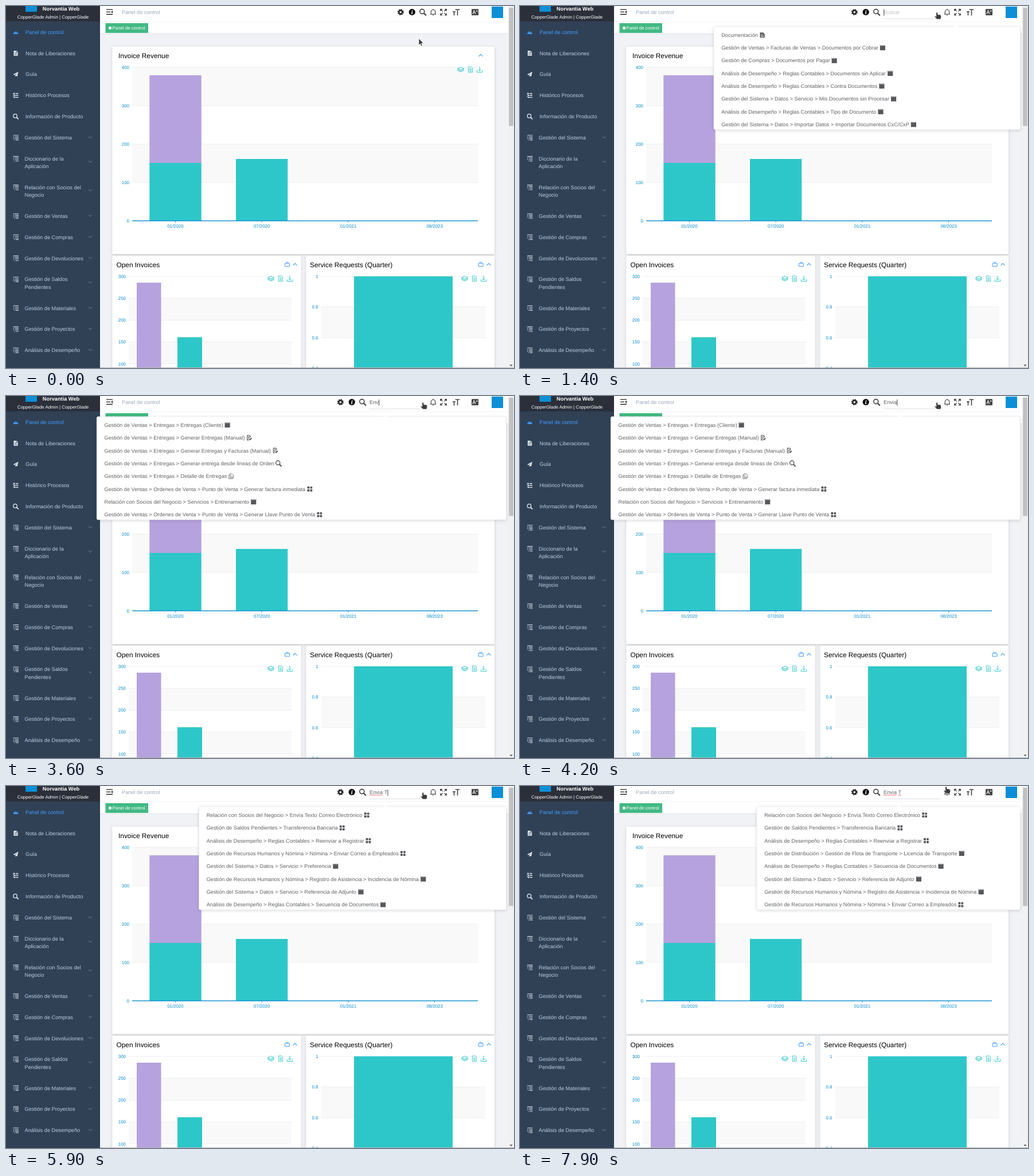
An HTML page for the animation above (8 s loop, 886x632 px).

```html
<!DOCTYPE html>
<html lang="es">
<head>
<meta charset="utf-8">
<title>Panel de control</title>
<style>
html, body { margin: 0; width: 100%; height: 100%; overflow: hidden; background: #fff; }
svg { display: block; }
text { font-family: "Liberation Sans", Arial, sans-serif; text-rendering: geometricPrecision; white-space: pre; }
.line { fill: none; stroke: currentColor; stroke-width: 1; }
</style>
</head>
<body>
<svg id="stage" width="886" height="632" viewBox="0 0 886 632">
  <defs>
    <filter id="shadow" x="-10%" y="-10%" width="120%" height="120%">
      <feDropShadow dx="0" dy="1.3" stdDeviation="2.6" flood-opacity=".16"/>
    </filter>
  </defs>
  <g id="page"></g>
  <g id="live"></g>
</svg>
<script>
const BODY = 9.215, SMALL = 7.9, TITLE = 11.85;
const TEAL = '#2ec7c9', PURPLE = '#b6a2de', AXIS = '#008acd', BLUE = '#409eff';
const $ = id => document.getElementById(id);

const rect = (x, y, w, h, fill, more = '') =>
  `<rect x="${x}" y="${y}" width="${w}" height="${h}" fill="${fill}" ${more}/>`;
const text = (x, y, str, size, fill, more = '') =>
  `<text x="${x}" y="${y}" font-size="${size}" fill="${fill}" ${more}>${str.replace(/>/g, '&gt;')}</text>`;
const line = (d, w = 1) => `<path class="line" style="stroke-width:${w}" d="${d}"/>`;
const solid = d => `<path fill="currentColor" d="${d}"/>`;
const pen = document.createElement('canvas').getContext('2d');
pen.font = '100px "Liberation Sans", Arial, sans-serif';
const widthOf = str => pen.measureText(str).width * BODY / 100;

// Every icon is drawn around its own centre
const icons = {
  gear: `<circle class="line" r="3" style="stroke-width:2.4"/>
    <circle class="line" r="4.7" style="stroke-width:1.7" stroke-dasharray="2 1.69"/>`,
  info: '<circle r="5.6" fill="currentColor"/><path d="M.5-3.6V-2.2M-.9-.7H.3L-.4 3H.9" fill="none" stroke="#fff" stroke-width="1.4"/>',
  search: '<circle class="line" cx="-1.1" cy="-1.1" r="3.7" style="stroke-width:1.5"/>' + line('M1.6 1.6L5.4 5.4', 2),
  bell: line('M-5 3.4H5M-3.7 3.4V-.6A3.7 3.7 0 0 1 3.7-.6V3.4M0-4.3V-5.6M-1.2 5.2H1.2', 1.1),
  full: line('M-1.4-1.4L-5-5M1.4-1.4L5-5M-1.4 1.4L-5 5M1.4 1.4L5 5M-5.2-2V-5.2H-2M2-5.2H5.2V-2M5.2 2V5.2H2M-2 5.2H-5.2V2', 1.2),
  size: line('M-1.4-4.6H6.2M2.5-4.6V5.8M-6-.8H-1M-3.5-.8V5.8', 1.6),
  lang: rect(-6, -5.5, 12, 11, 'currentColor', 'rx="1"') +
    '<path d="M-4.2 3.2L-1.6-3.4L1 3.2M-3.2 1H0M2.2-3.2L4.6-.8M4.6-3.2L2.2-.8" fill="none" stroke="#fff" stroke-width="1"/>',
  menu: line('M-5.5-4.2H5.5M-5.5 0H1.5M-5.5 4.2H5.5', 1.3) + solid('M5.6-2.4V2.4L2.6 0Z'),
  up: line('M-3.5 1.8L0-1.7L3.5 1.8', 1.1),
  down: line('M-2.8-1.3L0 1.4L2.8-1.3', 1),
  dash: solid('M-5 4A5 5 0 1 1 5 4Z') + '<path d="M0 2L1.6-2.4M-3.4 1H-2.4M2.6 1H3.6M-2-2L-1.3-1.3" stroke="#304156" stroke-width="1"/>',
  doc: solid('M-4-5H1.6L4.2-2.4V5H-4Z') + '<path d="M-2.4-.4H2.6M-2.4 2.2H2.6M1-4.6V-2H3.8" fill="none" stroke="#304156" stroke-width=".9"/>',
  plane: solid('M5-5L-5 .4L-2.2 1.8L3-2.6L-1 2.3V5L.8 3.1L3 4.2Z'),
  tree: solid('M-5-5H-1.6V-2.6H-5ZM-3.4-1.2H-.6V1.2H-3.4ZM-3.4 2.6H-.6V5H-3.4Z') +
    line('M0-3.8H5M.4 0H5M.4 3.8H5', 1.7) + line('M-4.5-3V3.8H-3', .8),
  list: line('M-4.7-4H4.7M-1.6-1.3H4.7M-1.6 1.4H4.7M-.4 4.1H4.7', 1.1) + line('M-4.7-1.3H-3M-4.7 1.4H-3M-3 4.1H-1.8', 1.1),
  layers: line('M0-4.4L5-2L0 .4L-5-2ZM-5-2V1.6L0 4.2L5 1.6V-2M-5 0L0 2.4L5 0', .9),
  sheet: line('M-3.6-4.8H1.6L3.6-2.8V4.8H-3.6ZM-2-1.4H2M-2 .6H2M-2 2.6H2', .9),
  save: line('M0-5V2.2M-2.8-.4L0 2.4L2.8-.4M-4.8 1.4V4.6H4.8V1.4', 1),
  box: line('M-4-1.6H4V3.4H-4ZM-2.6-3.4H2.6', 1),
  win: solid('M-4.7-4.6H-3.4L-2.6-3H-1.6L-2.2-4.6H-.4L.4-3H1.4L.8-4.6H2.2L3-3H3.6L3.2-4.6H4.7V4.5H-4.7Z'),
  note: solid('M-4-4.6H1.4L4.4-1.6V4.6H-4Z') + '<path d="M-2.4-1H1M-2.4 1.2H2.8M-2.4 3H2.8" stroke="#fff" stroke-width=".8"/>',
  edit: line('M2.4-1V-3L1-4.4H-3.4V4H-.6M-1.8-2H1M-1.8 0H1M-1.8 2H0', 1.2) + solid('M.2 4.4L.6 2.4L3.4-.4L5 1.2L2.2 4Z'),
  files: line('M-2-4.4H1.6L4.2-1.8V2.6H-2ZM-2-2.4H-4.2V4.4H2.4V2.6M-.6 0H2.6', .8),
  grid: solid('M-4.5-4.5H-.6V-.6H-4.5ZM-4.5 .6H-.6V4.5H-4.5ZM.6 .6H4.5V4.5H.6Z') + '<circle cx="2.6" cy="-2.5" r="2.1" fill="currentColor"/>'
};
const icon = (name, x, y, color, scale = 1) =>
  `<g transform="translate(${x} ${y}) scale(${scale})" color="${color}">${icons[name]}</g>`;

function sidebar() {
  const links = [['dash', 'Panel de control'], ['doc', 'Nota de Liberaciones'], ['plane', 'Guía'],
    ['tree', 'Histórico Procesos'], ['search', 'Información de Producto']];
  const groups = ['Gestión del Sistema', 'Diccionario de la|Aplicación', 'Relación con Socios del|Negocio',
    'Gestión de Ventas', 'Gestión de Compras', 'Gestión de Devoluciones', 'Gestión de Saldos|Pendientes',
    'Gestión de Materiales', 'Gestión de Proyectos', 'Análisis de Desempeño'];
  let out = rect(0, 0, 164, 632, '#304156') + rect(0, 0, 164, 27, '#2b2f3a') +
    rect(34, -10, 20, 20, '#0b8fd6') +
    text(96, 8, 'Norvantia Web', BODY, '#fff', 'text-anchor="middle" font-weight="bold"') +
    text(82, 21.8, 'CopperGlade Admin | CopperGlade', SMALL, '#fff', 'text-anchor="middle"');
  let y = 45.5;
  links.forEach(([name, label], i) => {
    out += icon(name, 17, y, i ? '#e3e9f0' : BLUE, .88) + text(34, y + 3.2, label, BODY, i ? '#bfcbd9' : BLUE);
    y += 36.85;
  });
  for (const label of groups) {
    const rows = label.split('|'), extra = (rows.length - 1) * 13.2;
    out += icon('list', 17.3, y, '#d5dde6') + icon('down', 147, y - .6 + extra * .42, '#78879a');
    rows.forEach((row, i) => out += text(32.5, y + 3.2 + i * 13.2, row, BODY, '#bfcbd9'));
    y += 36.85 + extra;
  }
  return out;
}

// Value axis with bands; rows run from the top tick downwards
function chart(x, right, top, step, labels, grayFirst, bars) {
  let out = '';
  labels.forEach((label, i) => {
    const y = top + i * step;
    if ((i % 2 === 0) === grayFirst && label !== '0') out += rect(x, y, right - x, step, '#f9f9f9');
  });
  labels.forEach((label, i) => {
    const y = top + i * step;
    out += rect(x, y - .35, right - x, .7, '#e9e9e9') +
      text(x - 5, y + 2.7, label, SMALL, AXIS, 'text-anchor="end"');
  });
  for (const [bx, by, w, h, fill] of bars) out += rect(bx, by, w, h, fill);
  return out;
}
const tools = (x, y) => icon('layers', x, y, TEAL) + icon('sheet', x + 17, y, TEAL) + icon('save', x + 33, y, TEAL);
const card = (x, y, w, h) => rect(x, y, w, h, '#fff', 'rx="1.5" filter="url(#shadow)"');

function dashboard() {
  let out = rect(164, 0, 722, 632, '#f0f2f5') +
    card(185.5, 71, 666.5, 362) + card(185.5, 436, 329, 230) + card(523.5, 436, 328.5, 230) +
    text(196, 91.3, 'Invoice Revenue', TITLE, '#000') + icon('up', 828, 86.3, BLUE) +
    chart(220, 823, 107, 67, ['400', '300', '200', '100', '0'], true,
      [[250.3, 121, 90.4, 153, PURPLE], [250.3, 274, 90.4, 101, TEAL], [401, 267, 90.3, 108, TEAL]]) +
    rect(220, 374.4, 603, 1.3, AXIS) + tools(793, 111);
  ['01/2020', '07/2020', '01/2021', '08/2023'].forEach((label, i) => {
    const x = 295.4 + i * 150.75;
    out += rect(x - .4, 375, .8, 3.3, AXIS) + text(x, 386.6, label, SMALL, AXIS, 'text-anchor="middle"');
  });
  return out +
    text(192.5, 456.3, 'Open Invoices', TITLE, '#000') + icon('box', 490.5, 451, BLUE) + icon('up', 504, 451, BLUE) +
    chart(214, 498, 472, 38.2, ['300', '250', '200', '150', '100'], false,
      [[228, 483, 42.5, 149, PURPLE], [299, 578.3, 43, 54, TEAL]]) + tools(462, 476) +
    text(530, 456.3, 'Service Requests (Quarter)', TITLE, '#000') + icon('box', 828, 451, BLUE) + icon('up', 842, 451, BLUE) +
    chart(549.5, 836, 472, 53.5, ['1', '0.8', '0.6', '0.4'], false, [[607, 472, 172, 160, TEAL]]) + tools(800, 476);
}

function topbar() {
  return rect(164, 0, 712, 48.5, '#fff') + rect(164, 27.3, 712, .7, '#eceef0') + rect(164, 48.2, 712, .8, '#d8dce5') +
    icon('menu', 180.5, 10.3, '#222') + text(202, 13.8, 'Panel de control', BODY, '#97a8be') +
    rect(173.5, 30, 74.5, 17, '#42b983') + '<circle cx="181.5" cy="38.4" r="2.6" fill="#fff"/>' +
    text(185.5, 41.4, 'Panel de control', SMALL, '#fff') +
    icon('bell', 745, 10.8, '#333') + icon('full', 763, 10.8, '#333') + icon('size', 785, 10.8, '#444') +
    icon('lang', 818, 10.8, '#444') + rect(847, 1, 20, 20, '#0b8fd6');
}

const scrollbar = () => rect(876, 0, 10, 632, '#f1f1f1') + rect(877.2, 3, 7.6, 206.5, '#c1c1c1') +
  solid('M878.4 626.3H883.6L881 629Z') + rect(164, 631, 722, 1, '#b5b5b5');

const SALES = 'Gestión de Ventas > ', BUYS = 'Gestión de Compras > ', SHIP = SALES + 'Entregas > ',
  POS = SALES + 'Ordenes de Venta > Punto de Venta > ', RULES = 'Análisis de Desempeño > Reglas Contables > ',
  SYSTEM = 'Gestión del Sistema > Datos > ', STAFF = 'Gestión de Recursos Humanos y Nómina > ',
  ATTEND = STAFF + 'Registro de Asistencia > ', PARTNER = 'Relación con Socios del Negocio > ',
  BALANCE = 'Gestión de Saldos Pendientes > ';
const MAIL = ['grid', STAFF + 'Nómina > Enviar Correo a Empleados'], RESEND = ['grid', RULES + 'Reenviar a Registrar'],
  INCIDENT = ['win', ATTEND + 'Incidencia de Nómina'], TRANSFER = ['grid', BALANCE + 'Transferencia Bancaria'],
  MESSAGE = ['grid', PARTNER + 'Envía Texto Correo Electrónico'],
  PREFERENCE = ['win', SYSTEM + 'Servicio > Preferencia'], REFERENCE = ['win', SYSTEM + 'Servicio > Referencia de Adjunto'],
  SEQUENCE = ['win', RULES + 'Secuencia de Documentos'],
  LICENCE = ['win', 'Gestión de Distribución > Gestión de Flota de Transporte > Licencia de Transporte'];

const menus = {
  recent: { x: 338, tip: 760, rows: [['note', 'Documentación'],
    ['win', SALES + 'Facturas de Ventas > Documentos por Cobrar'], ['win', BUYS + 'Documentos por Pagar'],
    ['win', RULES + 'Documentos sin Aplicar'], ['win', RULES + 'Contra Documentos'],
    ['win', SYSTEM + 'Servicio > Mis Documentos sin Procesar'], ['win', RULES + 'Tipo de Documento'],
    ['win', SYSTEM + 'Importar Datos > Importar Documentos CxC/CxP']] },
  env: { x: 158.3, tip: 661, rows: [['win', SHIP + 'Entregas (Cliente)'], ['edit', SHIP + 'Generar Entregas (Manual)'],
    ['edit', SHIP + 'Generar Entregas y Facturas (Manual)'], ['search', SHIP + 'Generar entrega desde líneas de Orden'],
    ['files', SHIP + 'Detalle de Entregas'], ['grid', POS + 'Generar factura inmediata'],
    ['win', PARTNER + 'Servicios > Entrenamiento'], ['grid', POS + 'Generar Llave Punto de Venta']] },
  envia: { x: 371.8, tip: 661, rows: [MAIL, ['grid', STAFF + 'Nómina > Enviar Recibo de Nómina por Correo Electrónico'],
    RESEND, INCIDENT, PREFERENCE, ['search', ATTEND + 'Procesar Incidencias (Manual)'],
    ['win', ATTEND + 'Registro de Asistencia'], TRANSFER] },
  mixed: { x: 336.5, tip: 661, rows: [MESSAGE, TRANSFER, RESEND, MAIL, PREFERENCE, INCIDENT, REFERENCE, SEQUENCE] },
  enviaT: { x: 413, tip: 661, rows: [MESSAGE, TRANSFER, RESEND, LICENCE, SEQUENCE, REFERENCE, INCIDENT, MAIL] }
};

function dropdown({ x, tip, rows }, open) {
  let out = rect(x, 36, 872.4 - x, 180, '#fff', 'rx="2.5" stroke="#e4e7ed" stroke-width=".7" filter="url(#shadow)"') +
    `<path d="M${tip - 4} 36.6L${tip} 32.6L${tip + 4} 36.6Z" fill="#fff"/>`;
  rows.forEach(([name, label], i) => {
    const y = 50.7 + i * 22.35;
    out += text(x + 13.2, y + 3.2, label, BODY, '#606266') + icon(name, x + 20.4 + widthOf(label), y, '#55575b', .97);
  });
  return `<g opacity="${open}" transform="translate(0 ${36 - 36 * open}) scale(1 ${open})">${out}</g>`;
}

function bezier(x1, y1, x2, y2, p) {
  if (p <= 0) return 0;
  if (p >= 1) return 1;
  const at = (a, b, u) => 3 * (1 - u) ** 2 * u * a + 3 * (1 - u) * u * u * b + u ** 3;
  let lo = 0, hi = 1;
  for (let i = 0; i < 20; i++) {
    const mid = (lo + hi) / 2;
    if (at(x1, x2, mid) < p) lo = mid; else hi = mid;
  }
  return at(y1, y2, lo);
}

// Latest value whose start time has passed
const pick = (t, steps) => steps.filter(([start]) => start <= t).pop()[1];
const TYPED = [[0, ''], [3000, 'E'], [3600, 'Env'], [3700, 'Envi'], [4200, 'Envia'], [5500, 'Envia '], [5800, 'Envia T']];
const CARET = [[0, 0], [1200, 1], [1800, 0], [2400, 1], [5000, 0], [5500, 1], [6500, 0], [7100, 1], [7700, 0]];
const MENU = [[0, 'recent'], [3600, 'env'], [4300, 'envia'], [5900, 'mixed'], [6300, 'enviaT']];
const OPEN = 1167;

function searchBox(t, left) {
  const typed = pick(t, TYPED);
  const squiggle = (a, b) => `<path d="M${a} 16H${b}" stroke="#e0393e" stroke-width="1.2" stroke-dasharray="1.6 .7"/>`;
  let out = rect(0, 22, 99, .8, '#d3d6db') +
    text(0, 14.4, typed || 'Buscar', BODY, typed ? '#606266' : '#c0c4cc');
  if (pick(t, CARET)) out += rect(.3 + widthOf(typed), 6, .9, 11, '#333');
  if (t >= 4800) out += squiggle(0, 23);
  if (t >= 6900) out += squiggle(25.5, 31);
  return `<svg x="${left}" y="0" width="${Math.max(0, 733 - left)}" height="27">${out}</svg>`;
}

function pointer(t) {
  const p = Math.min(1, Math.max(0, (t - 300) / 600));
  const x = 720 + 7 * p, y = 57 - 46 * p;
  const [dx, dy] = t >= 7900 ? [16, -10] : [0, 0];
  const shape = p > .85
    ? 'M-1.3 1Q0-.8 1.3 1L1.8 4.2Q5 3.6 7.4 5.4Q8 8 6.6 12H.2L-4 7.6Q-3.8 5.8-1 7.4Z'
    : 'M0 0V11L2.5 8.8L4.2 12.6L6.1 11.7L4.4 8.1L7.8 7.8Z';
  return `<path transform="translate(${x + dx} ${y + dy})" d="${shape}" fill="#3c3c3c" stroke="#fff" stroke-width=".5"/>`;
}

function render(t) {
  const shift = t < 1100 ? 0 : 6.6 + 98.4 * bezier(.25, .1, .25, 1, (t - OPEN) / 200);
  let out = icon('gear', 688.3 - shift, 10.8, '#222') + icon('info', 708.2 - shift, 10.6, '#000') +
    icon('search', 727 - shift, 10.8, '#444', 1.08);
  if (shift) out += searchBox(t, 739 - shift);
  if (t >= OPEN) out += dropdown(menus[pick(t, MENU)], bezier(.23, 1, .32, 1, (t - OPEN) / 300));
  $('live').innerHTML = out + pointer(t);
}

$('page').innerHTML = dashboard() + topbar() + sidebar() + `<g color="#505050">${scrollbar()}</g>`;
const begin = performance.now();
let shown = -1;
function tick() {
  const t = Math.floor((performance.now() - begin) % 8000 / 100) * 100;
  if (t !== shown) render(shown = t);
  requestAnimationFrame(tick);
}
tick();
</script>
</body>
</html>
```
